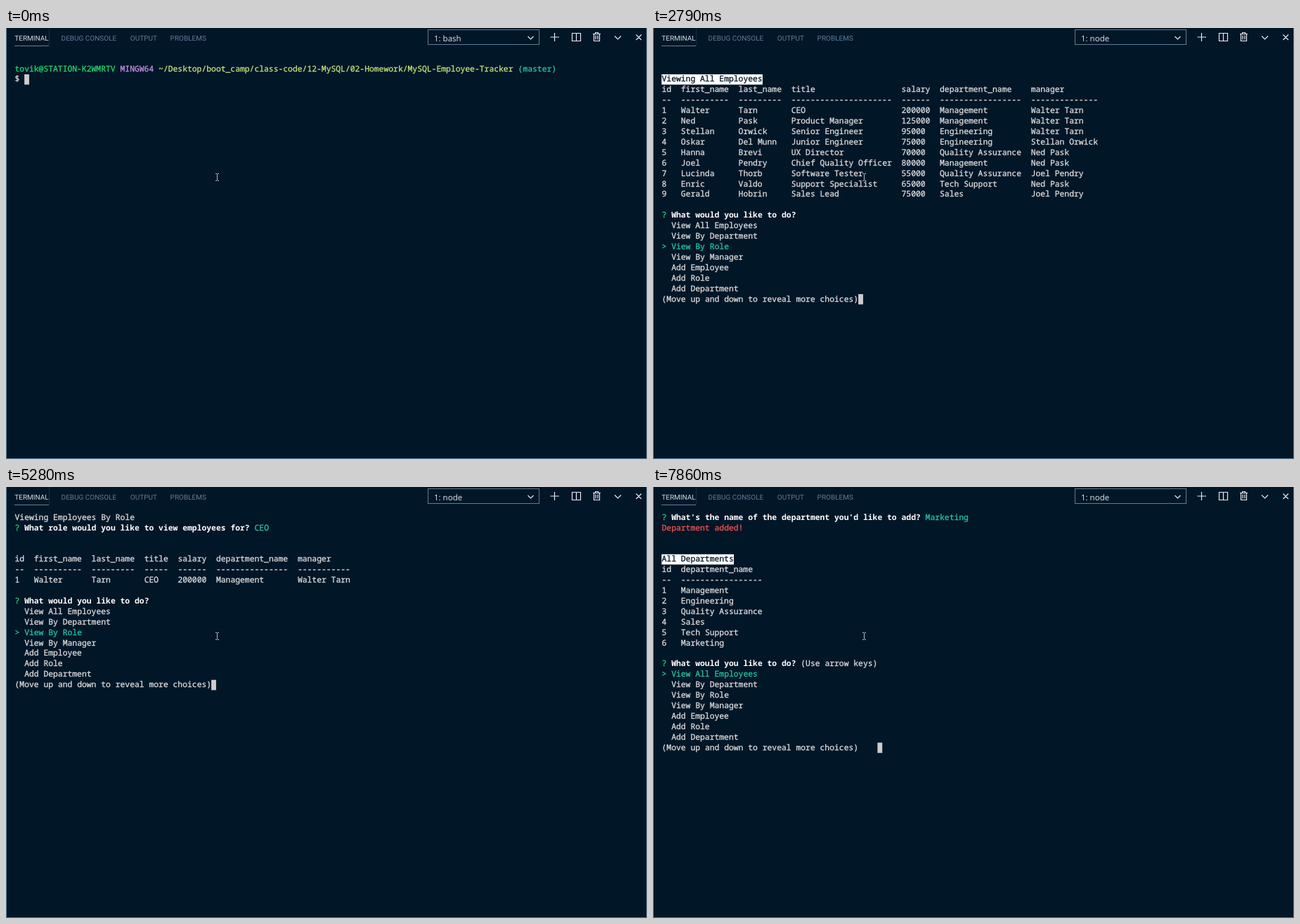
Write an HTML page that moves like this. It is 912 px wide and 614 px high and loops after 8 s.

```html
<!DOCTYPE html>
<html lang="en">
<head>
<meta charset="utf-8">
<title>Employee tracker terminal</title>
<style>
  html, body { margin: 0; width: 100%; height: 100%; overflow: hidden; background: #011627; }
  svg { display: block; width: 912px; height: 614px; }
  text { white-space: pre; text-rendering: geometricPrecision; }
  #screen { font: 11.37px "Noto Sans Mono", "DejaVu Sans Mono", monospace; stroke-width: .3; }
  .tabs { font: 10px Roboto, "Open Sans", sans-serif; fill: #5f7e97; }
  #shell { font: 11.5px "Open Sans", "Noto Sans", sans-serif; fill: #e2e8f0; }
  .line { fill: none; stroke: #5f7e97; }
  .icon { fill: none; stroke: #e6ebf2; stroke-width: 1.2; }
</style>
</head>
<body>
<svg viewBox="0 0 912 614">
  <defs>
    <pattern id="shade" width="2" height="2" patternUnits="userSpaceOnUse">
      <path d="M0 0h1v1h-1zM1 1h1v1h-1z" fill="#ccc" opacity=".55"/>
    </pattern>
  </defs>
  <rect width="912" height="614" fill="#011627"/>
  <path class="line" d="M.5 0V613.5H911.5V0"/>
  <g class="tabs">
    <text x="12.3" y="17.7" fill="#d2dee7">TERMINAL</text>
    <text x="78.6" y="17.7">DEBUG CONSOLE</text>
    <text x="176.8" y="17.7">OUTPUT</text>
    <text x="233.6" y="17.7">PROBLEMS</text>
  </g>
  <path class="line" d="M12 25.5H61"/>
  <path class="line" d="M61.5 0V25" opacity=".25"/>
  <rect class="line" x="600.5" y="2.5" width="158" height="21"/>
  <text id="shell" x="609" y="18.6"></text>
  <path class="icon" d="M742.5 12l4 4 4-4M866 11.5l4.5 4.5 4.5-4.5M896.5 9.5l7.5 7.5M904 9.5l-7.5 7.5"/>
  <path class="icon" d="M774.5 13h12.500M780.500 7v12M805.500 7.500h12v11h-12zM811.500 7.500v11"/>
  <path class="icon" d="M835 8.500h11M838.500 8.500v-2h4v2M836.500 9v9.500h8v-9.500M839 10.500v6M842 10.500v6"/>
  <g id="screen"></g>
  <path d="M298 207.500h2M301 207.500h2M300.500 208v9M298 217.500h2M301 217.500h2" fill="none" stroke="#b4bac0"/>
</svg>
<script>
const LOOP = 8000, CW = 6.82, LH = 14.91, LEFT = 12.5, TOP = 36.2, BLOCK = 14.6;
const FG = '#ddd', GREY = '#ccc', WHITE = '#fff', CYAN = '#21c7a8', GREEN = '#22da6e',
      PURPLE = '#c792ea', LIME = '#c5e478', RED = '#ef5350', DARK = '#011627';
const screen = document.getElementById('screen');
const shell = document.getElementById('shell');
const colX = col => LEFT + col * CW;
const rowY = row => TOP + row * LH;

const box = (x, y, w, h, fill) =>
  `<rect x="${x.toFixed(2)}" y="${y.toFixed(2)}" width="${w}" height="${h}" fill="${fill}"/>`;

// Each word is set on the character grid.
const put = (row, col, str, fill = FG, bold = false) =>
  [...str.matchAll(/\S+/g)].map(m =>
    `<text x="${colX(col + m.index).toFixed(2)}" y="${(rowY(row) + 10.4).toFixed(2)}" fill="${fill}" ` +
    `${bold ? 'font-weight="700"' : `stroke="${fill}"`}>${m[0].replace('>', '&gt;')}</text>`).join('');

const cursor = (row, col) => box(colX(col), rowY(row), CW, BLOCK, GREY);

const badge = (row, str) =>
  box(LEFT - .3, rowY(row), (str.length * CW + .5).toFixed(2), BLOCK, WHITE) + put(row, 0, str, DARK);

const ask = (row, question, answer = '', fill = FG) =>
  put(row, 0, '?', GREEN) + put(row, 2, question, WHITE, true) +
  put(row, question.length + 3, answer, fill);

function table(row, head, data) {
  const widths = head.map((h, i) => Math.max(h.length, ...data.map(r => r[i].length)));
  const rows = [head, widths.map(w => '-'.repeat(w)), ...data];
  return rows.map((cells, r) =>
    put(row + r, 0, cells.map((c, i) => c.padEnd(widths[i] + 2)).join(''))).join('');
}

// The pointer stops at the fourth place; after that the list scrolls.
function list(row, question, items, pick, moved, at) {
  const hint = moved ? '' : '(Use arrow keys)';
  const more = '(Move up and down to reveal more choices)';
  const first = Math.max(0, pick - 3);
  const end = at || (moved ? more.length : question.length + 3 + hint.length);
  return ask(row, question, hint) +
    items.slice(first, first + 7).map((item, i) => {
      const on = first + i === pick;
      return put(row + 1 + i, 0, (on ? '> ' : '  ') + item, on ? CYAN : FG);
    }).join('') + put(row + 8, 0, more) + cursor(row + 8, end);
}

const actions = ['View All Employees', 'View By Department', 'View By Role', 'View By Manager',
  'Add Employee', 'Add Role', 'Add Department', 'Remove Employee', 'Remove Role', 'Remove Department'];
const menu = (row, pick = 0, moved = false, at = 0) =>
  list(row, 'What would you like to do?', actions, pick, moved, at);

const head = ['id', 'first_name', 'last_name', 'title', 'salary', 'department_name', 'manager'];
const staff = `Walter,Tarn,CEO,200000,Management,Walter Tarn
Ned,Pask,Product Manager,125000,Management,Walter Tarn
Stellan,Orwick,Senior Engineer,95000,Engineering,Walter Tarn
Oskar,Del Munn,Junior Engineer,75000,Engineering,Stellan Orwick
Hanna,Brevi,UX Director,70000,Quality Assurance,Ned Pask
Joel,Pendry,Chief Quality Officer,80000,Management,Ned Pask
Lucinda,Thorb,Software Tester,55000,Quality Assurance,Joel Pendry
Enric,Valdo,Support Specialist,65000,Tech Support,Ned Pask
Gerald,Hobrin,Sales Lead,75000,Sales,Joel Pendry`
  .split('\n').map((line, i) => [String(i + 1), ...line.split(',')]);
const titles = staff.map(r => r[3]);
const departments = ['Management', 'Engineering', 'Quality Assurance', 'Sales', 'Tech Support', 'Marketing']
  .map((name, i) => [String(i + 1), name]);

const banner = [
  '░█▀▀▀ █▀▄▀█ █▀▀█ █── █▀▀█ █──█ █▀▀ █▀▀    ▀▀█▀▀ █▀▀█ █▀▀█ █▀▀ █─█ █▀▀ █▀▀█',
  '░█▀▀▀ █─▀─█ █──█ █── █──█ █▄▄█ █▀▀ █▀▀    ─░█── █▄▄▀ █▄▄█ █── █▀▄ █▀▀ █▄▄▀',
  '░█▄▄▄ ▀───▀ █▀▀▀ ▀▀▀ ▀▀▀▀ ▄▄▄█ ▀▀▀ ▀▀▀    ─░█── ▀─▀▀ ▀──▀ ▀▀▀ ▀─▀ ▀▀▀ ▀─▀▀'];
const blocks = { '█': [0, 13.8], '▀': [0, 6.9], '▄': [6.9, 6.9], '─': [6.5, 1], '░': [0, 13.8] };
const title = () => banner.map((line, r) => [...line].map((ch, c) => {
  const b = blocks[ch];
  return b ? box(colX(c + 2), rowY(r + 3) + b[0], CW + .1, b[1], ch === '░' ? 'url(#shade)' : GREY) : '';
}).join('')).join('');

function prompt(cmd, sent) {
  let col = 0;
  const parts = [['tovik@STATION-K2WMRTV', GREEN], ['MINGW64', PURPLE],
    ['~/Desktop/boot_camp/class-code/12-MySQL/02-Homework/MySQL-Employee-Tracker', LIME],
    ['(master)', CYAN]];
  const path = parts.map(([str, fill]) => {
    const out = put(1, col, str, fill);
    col += str.length + 1;
    return out;
  }).join('');
  return path + put(2, 0, '$ ' + cmd) + (sent ? cursor(3, 0) : cursor(2, 2 + cmd.length));
}

const everyone = (pick, moved) => badge(2, 'Viewing All Employees') + table(3, head, staff) +
  menu(15, pick, moved, moved ? 0 : 91);

const roleHead = put(0, 0, 'Viewing Employees By Role');
const roleAsk = 'What role would you like to view employees for?';
const roleList = () => roleHead + list(1, roleAsk, titles, 0, false);
const roleDone = rest => roleHead + ask(1, roleAsk, 'CEO', CYAN) +
  table(4, head, staff.slice(0, 1)) + rest;

const deptAsk = "What's the name of the department you'd like to add?";
const typing = n => ask(0, deptAsk, 'Marketing'.slice(0, n)) + cursor(0, 55 + n);
const answered = rest => ask(0, deptAsk, 'Marketing', CYAN) + rest;
const added = () => answered(put(1, 0, 'Department added!', RED) + badge(4, 'All Departments') +
  table(5, ['id', 'department_name'], departments) + menu(14));

const steps = [
  [0, () => prompt('')],
  [510, () => prompt('clear')],
  [660, () => prompt('node server.js')],
  [860, () => prompt('node server.js', true)],
  [1120, () => title() + menu(8)],
  [1800, () => everyone(0, false)],
  [2660, () => everyone(1, true)],
  [2790, () => everyone(2, true)],
  [3350, roleList],
  [4310, () => roleDone(menu(8))],
  [5020, () => roleDone(menu(8, 1, true))],
  [5220, () => roleDone(cursor(16, 129))],
  ...[5280, 5350, 5480, 5770, 5830].map((t, i) => [t, () => roleDone(menu(8, i + 2, true))]),
  [6250, () => typing(0)],
  [6870, () => typing(1)],
  [7220, () => typing(2)],
  ...Array.from({ length: 7 }, (_, i) => [7360 + i * 62.5, () => typing(i + 3)]),
  [7797, () => answered(cursor(1, 0))],
  [7860, added]
];

let shown = -1;
function draw(t) {
  let k = steps.length - 1;
  while (steps[k][0] > t) k--;
  if (k === shown) return;
  shown = k;
  screen.innerHTML = steps[k][1]();
  shell.textContent = t < 860 ? '1: bash' : '1: node';
}
function tick() {
  draw(performance.now() % LOOP);
  requestAnimationFrame(tick);
}
tick();
</script>
</body>
</html>
```
